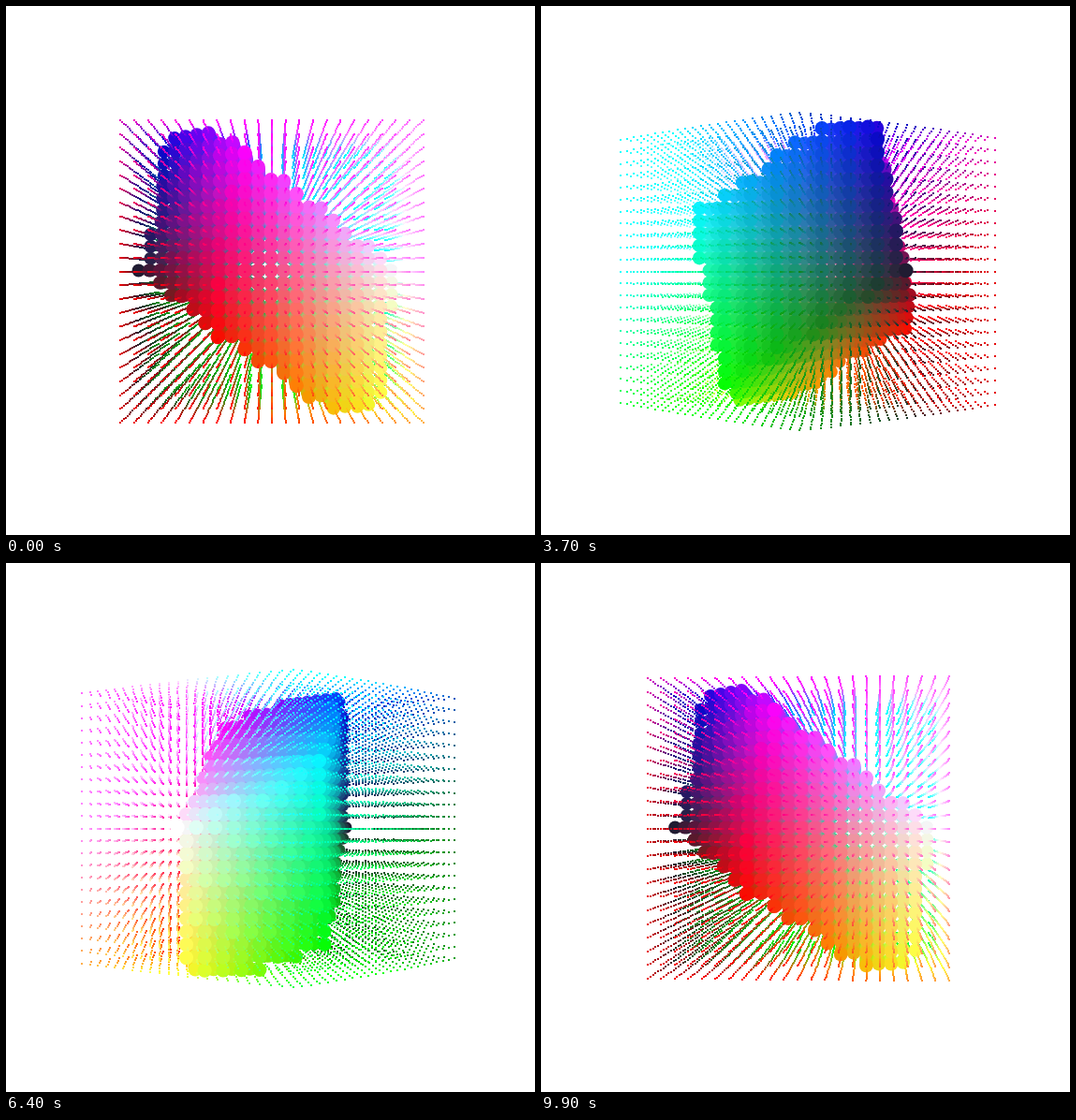
Write an HTML page with a canvas that moves like this. It is 565 px wide and 565 px high and loops after 10000 ms.

```html
<!DOCTYPE html>
<html lang="en">
<head>
<meta charset="utf-8">
<title>Rotating colour space</title>
<style>
  html, body { margin: 0; width: 100%; height: 100%; overflow: hidden; background: #fff; }
  canvas { display: block; }
</style>
</head>
<body>
<canvas id="stage" width="565" height="565"></canvas>
<script>
const ctx = document.getElementById('stage').getContext('2d');
const HALF = 11, SIZE = 22;              // 23 grid points per axis
const CX = 283, CY = 282.5, UNIT = 141.4; // screen centre and half edge of the cube
const STEP = 100, STEPS = 100;
const SHADE = [32, 28, 50];              // tone that black fades to
const EPS = 1e-6;

const inside = c => c > -EPS && c < SIZE + EPS;
const clamp = c => Math.max(0, Math.min(1, c / SIZE));

function toColor(rgb) {
  const c = rgb.map(clamp);
  const dark = 1 - Math.max(...c);
  return `rgb(${c.map((v, i) => Math.round(255 * v + SHADE[i] * dark))})`;
}

// One grid point: luma y (0..22), chroma u (vertical) and v (depth)
function makePoint(y, u, v) {
  const rgb = [y + 1.772 * v, y - 0.272 * u - 0.902 * v, y + 1.4 * u];
  return { h: u / HALF, big: rgb.every(inside), color: toColor(rgb) };
}

const columns = [];
for (let y = 0; y <= SIZE; y++) {
  for (let v = -HALF; v <= HALF; v++) {
    const points = [];
    for (let u = -HALF; u <= HALF; u++) points.push(makePoint(y, u, v));
    columns.push({ x: y / HALF - 1, z: v / HALF, points });
  }
}

function draw(angle) {
  const cos = Math.cos(angle), sin = Math.sin(angle);
  for (const c of columns) {
    c.sx = c.x * cos + c.z * sin;
    c.depth = c.z * cos - c.x * sin;
  }
  columns.sort((a, b) => a.depth - b.depth);

  ctx.fillStyle = '#fff';
  ctx.fillRect(0, 0, 565, 565);
  for (const c of columns) {
    const zoom = 1 + c.depth / 7;
    const px = CX + c.sx * UNIT * zoom;
    for (const p of c.points) {
      const py = CY - p.h * UNIT * zoom;
      ctx.fillStyle = p.color;
      if (p.big) {
        ctx.beginPath();
        ctx.arc(px, py, 7 * zoom, 0, 2 * Math.PI);
        ctx.fill();
      } else {
        ctx.fillRect(Math.round(px), Math.round(py), 2, 2);
      }
    }
  }
}

const start = performance.now();
let shown = -1;
function tick() {
  const step = Math.floor((performance.now() - start) / STEP) % STEPS;
  if (step !== shown) {
    shown = step;
    draw(step / STEPS * 2 * Math.PI);
  }
  requestAnimationFrame(tick);
}
tick();
</script>
</body>
</html>
```
